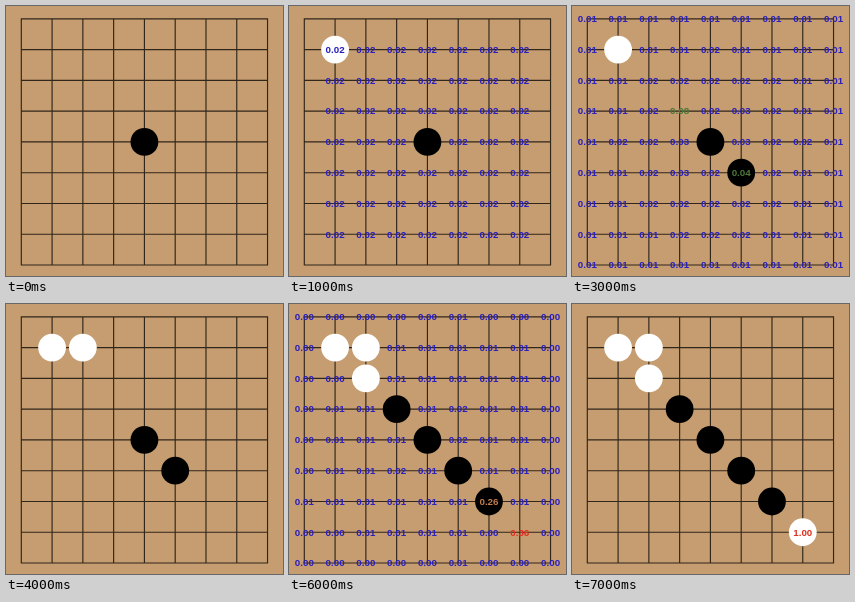
Recreate the animation shown at these times as an HTML page with a canvas. Size 277x270 px, loop 8 s.

```html
<!DOCTYPE html>
<html>
<head>
<meta charset="utf-8">
<style>
html, body { margin: 0; width: 100%; height: 100%; overflow: hidden; background: #c69d70; }
canvas { display: block; }
</style>
</head>
<body>
<canvas id="board" width="277" height="270"></canvas>
<script>
const ctx = document.getElementById('board').getContext('2d');
const SIZE = 9, LEFT = 15.3, TOP = 12.8, STEP = 30.78, STONE = 13.9;
const BLUE = '#2a20bc', GREEN = '#4c7838', RED = '#e03020', ORANGE = '#c07c4c';
const BLACK = '#000', WHITE = '#fff';

// Stones in playing order: column, row, colour
const moves = [
  [4, 4, BLACK], [1, 1, WHITE], [5, 5, BLACK], [2, 1, WHITE],
  [3, 3, BLACK], [2, 2, WHITE], [6, 6, BLACK], [7, 7, WHITE]
];

// Each digit is hundredths of a probability; a dot leaves the point empty
const opening = Array.from({ length: SIZE }, (_, y) =>
  y > 0 && y < 8 ? '.2222222.' : '.........');
const early = [
  '111111111',
  '1.1121111',
  '112222211',
  '112.23211',
  '1223.3221',
  '11232.211',
  '112222211',
  '111222111',
  '111111111'
];
const late = [
  '000001000',
  '0..111110',
  '00.111110',
  '011.12110',
  '0111.2110',
  '01121.110',
  '111111.10',
  '0011110.0',
  '000001000'
];

// One entry per second: stones on the board, value grid, highlighted values
const scenes = [
  { stones: 1 },
  { stones: 2, grid: opening },
  { stones: 2 },
  { stones: 3, grid: early, marks: [[3, 3, '0.08', GREEN], [5, 5, '0.04', GREEN]] },
  { stones: 4 },
  { stones: 6, marks: [[2, 2, '0.50', RED], [6, 6, '0.50', RED]] },
  { stones: 7, grid: late, marks: [[6, 6, '0.26', ORANGE], [7, 7, '0.36', RED]] },
  { stones: 8, marks: [[7, 7, '1.00', RED]] }
];

const px = col => LEFT + col * STEP;
const py = row => TOP + row * STEP;

function drawBoard() {
  ctx.fillStyle = '#c69d70';
  ctx.fillRect(0, 0, 277, 270);
  ctx.strokeStyle = '#30261a';
  ctx.lineWidth = 1.15;
  ctx.lineCap = 'square';
  ctx.beginPath();
  for (let i = 0; i < SIZE; i++) {
    ctx.moveTo(px(i), py(0));
    ctx.lineTo(px(i), py(8));
    ctx.moveTo(px(0), py(i));
    ctx.lineTo(px(8), py(i));
  }
  ctx.stroke();
}

function drawStone([col, row, color]) {
  ctx.fillStyle = color;
  ctx.beginPath();
  ctx.arc(px(col), py(row), STONE, 0, Math.PI * 2);
  ctx.fill();
}

function drawValue([col, row, text, color]) {
  ctx.fillStyle = color;
  ctx.fillText(text, px(col), py(row) + 3.3);
}

function drawScene({ stones, grid = [], marks = [] }) {
  const placed = moves.slice(0, stones);
  const underBlack = (x, y) => placed.some(
    ([col, row, color]) => col === x && row === y && color === BLACK);
  drawBoard();
  placed.forEach(drawStone);
  ctx.font = 'bold 9.8px "Liberation Sans", Arial, sans-serif';
  ctx.textAlign = 'center';
  grid.forEach((line, y) => [...line].forEach((digit, x) => {
    if (digit !== '.' && !underBlack(x, y)) drawValue([x, y, '0.0' + digit, BLUE]);
  }));
  marks.forEach(drawValue);
}

function tick(now) {
  drawScene(scenes[Math.floor(now / 1000) % scenes.length]);
  requestAnimationFrame(tick);
}
tick(performance.now());
</script>
</body>
</html>
```
